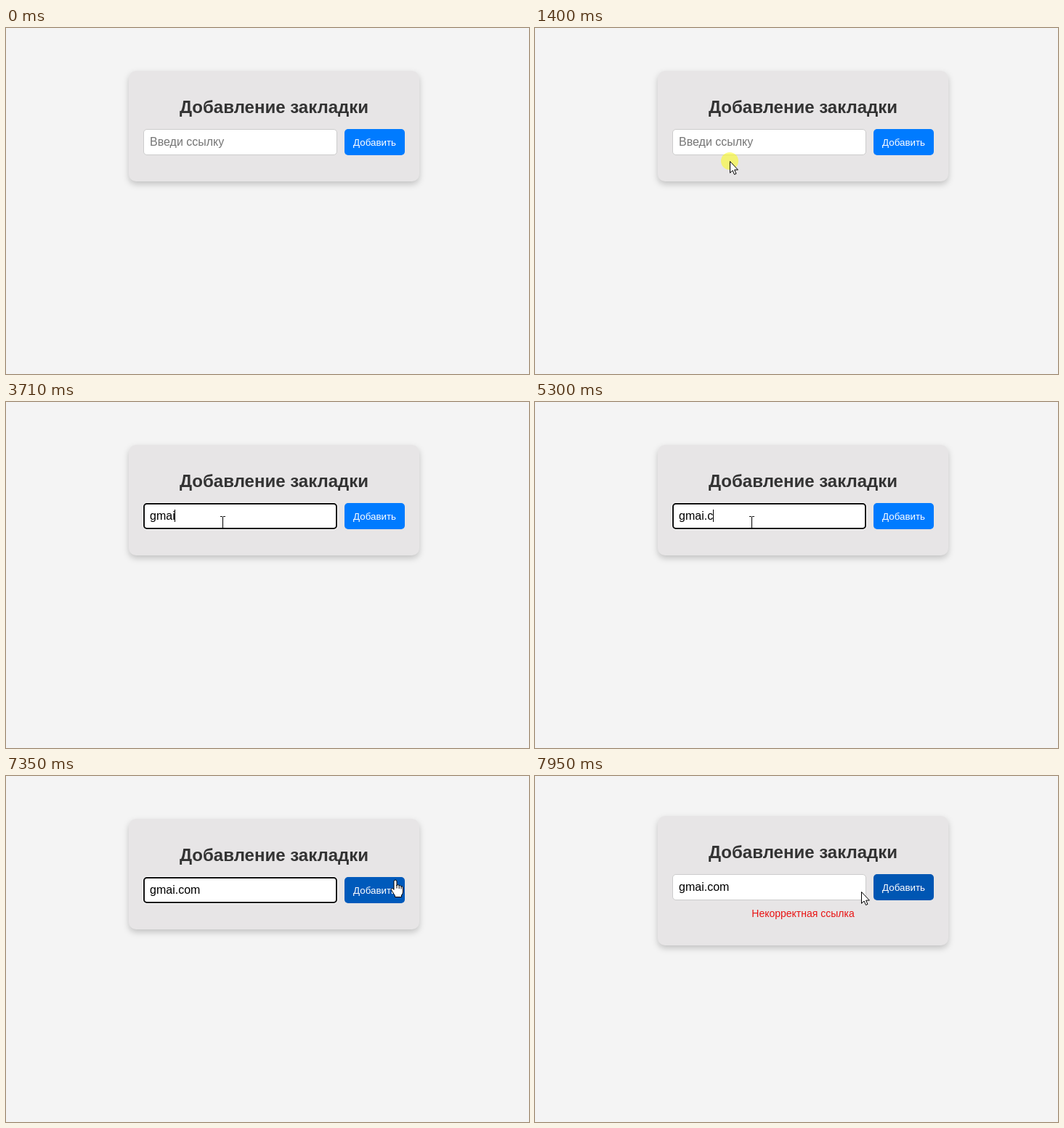
Write an HTML page that moves like this. It is 720 px wide and 476 px high and loops after 8 s.

```html
<!DOCTYPE html>
<html lang="ru">
<head>
<meta charset="utf-8">
<title>Добавление закладки</title>
<style>
  html, body { margin: 0; width: 100%; height: 100%; overflow: hidden; background: #f4f4f4; }
  svg { display: block; width: 720px; height: 476px; font: 16px "Liberation Sans", Arial, sans-serif; }
  #card { filter: drop-shadow(0 4px 4px rgba(0, 0, 0, .2)); }
  #title { font-size: 24px; font-weight: bold; fill: #333; }
  #label { font-size: 13.333px; fill: #fff; }
  #error { font-size: 14px; fill: #e81414; }
  .pointer { fill: #fff; stroke: #000; stroke-linejoin: round; }
</style>
</head>
<body>
<svg viewBox="0 0 720 476">
  <rect id="card" x="169" y="59" width="400" height="152" rx="10" fill="#e7e5e6"/>
  <g id="form">
    <text id="title" x="369" y="117" text-anchor="middle">Добавление закладки</text>
    <rect x="189.5" y="139.5" width="266" height="35" rx="4.5" fill="#fff" stroke="#ccc"/>
    <g id="ring" fill="none">
      <rect x="188.5" y="138.5" width="268" height="37" rx="5.5" stroke="#fff"/>
      <rect x="190" y="140" width="265" height="34" rx="4" stroke="#101010" stroke-width="2"/>
    </g>
    <text id="value" x="198" y="162"></text>
    <rect id="caret" y="148" width="1" height="17"/>
    <rect id="button" x="466" y="139" width="83" height="36" rx="5"/>
    <text id="label" x="507.5" y="162" text-anchor="middle">Добавить</text>
  </g>
  <text id="error" x="369" y="194" text-anchor="middle">Некорректная ссылка</text>
  <g id="cursor">
    <circle id="press" r="12" fill="#ff0" opacity=".5"/>
    <path id="arrow" class="pointer" d="M.5 .5V16.3L4.1 13 6.5 18.5 9 17.4 6.6 12.1H11.4Z"/>
    <path id="beam" fill="none" stroke="#000" d="M-3-7.5H0M1-7.5H4M.5-7V8M-3 8.5H0M1 8.5H4"/>
    <g id="hand" class="pointer">
      <path d="M-2 1Q-2-1 0-1Q2-1 2 1V7Q2 5.5 3.6 5.6Q5 5.7 5.2 7.2Q5.4 6.4 6.6 6.6Q8 6.8 8.1 8.3Q8.4 7.6 9.3 7.8Q10.5 8 10.5 10V15Q10.5 18 8.5 20V22.5H-.5V20.5Q-2 18.5-3.5 16L-5.6 12.6Q-6 11-4.6 10.6Q-3.2 10.4-2 12.4Z"/>
      <path d="M2 6V10.5M5.2 7V11M8.1 8V11.5"/>
    </g>
  </g>
</svg>
<script>
const LOOP = 8000;
const $ = id => document.getElementById(id);
const show = (id, on) => $(id).style.display = on ? '' : 'none';
const last = (list, t) => list.findLast(step => step[0] <= t);

// time, x, y, shape; the pointer holds each place until the next one
const moves = [
  [0, 0, 0, ''],
  [260, 688, 462, 'arrow'], [330, 655, 385, 'arrow'], [400, 617, 308, 'arrow'],
  [470, 576, 232, 'arrow'], [530, 540, 172, 'hand'], [600, 508, 144, 'hand'], [660, 484, 124, 'arrow'],
  [870, 470, 139, 'hand'], [930, 395, 152, 'beam'], [1000, 312, 163, 'beam'], [1060, 276, 168, 'beam'],
  [1200, 271, 179, 'arrow'], [1260, 268, 183, 'arrow'],
  [1530, 282, 173, 'beam'], [1600, 294, 167, 'beam'], [1660, 298, 165, 'beam'],
  [6150, 299, 165, 'beam'], [6220, 299, 164, 'beam'], [6750, 298, 163, 'beam'],
  [6890, 318, 179, 'arrow'], [6950, 368, 199, 'arrow'], [7020, 419, 208, 'arrow'], [7080, 468, 195, 'arrow'],
  [7150, 508, 171, 'hand'], [7220, 526, 156, 'hand'], [7290, 533, 148, 'hand'], [7350, 536, 144, 'hand'],
  [7420, 530, 150, 'hand'], [7480, 523, 156, 'hand'], [7550, 520, 159, 'hand'],
  [7880, 488, 160, 'arrow'], [7950, 449, 159, 'arrow']
];

// time, typed text, caret visible
const typing = [
  [0, '', 0], [1660, '', 1], [2260, 'g', 0], [2320, 'g', 1], [2520, 'gm,', 1],
  [2720, 'gm,a', 1], [2790, 'gm,ai', 1], [3180, 'gm,a', 1],
  [3320, 'gm,', 1], [3450, 'gm', 1], [3580, 'gma', 1], [3710, 'gmai', 1],
  [3980, 'gmai,', 1], [4310, 'gmai', 1], [4510, 'gmai', 0], [4770, 'gmai.', 1],
  [5300, 'gmai.c', 1], [5360, 'gmai.co', 1], [5560, 'gmai.com', 1],
  [6090, 'gmai.com', 0], [6620, 'gmai.com', 1], [7120, 'gmai.com', 0]
];

const presses = [[1400, 1530], [1660, 1800], [7550, 7680]];
const hovers = [[530, 660], [870, 930], [7150, 9000]];
const within = (spans, t) => spans.some(([a, b]) => t >= a && t < b);

const ease = u => 1 - (1 - Math.min(1, Math.max(0, u))) ** 2;
const hoverLevel = t => Math.max(0, ...hovers.map(([a, b]) =>
  ease((Math.min(t, b) - a) / 300) * (1 - ease((t - b) / 300))));

function draw(t) {
  const [, x, y, shape] = last(moves, t);
  const [, text, caret] = last(typing, t);
  const failed = t >= 7610;

  $('form').setAttribute('transform', `translate(0 ${failed ? -4 : 0})`);
  $('card').setAttribute('y', failed ? 55 : 59);
  $('card').setAttribute('height', failed ? 178 : 152);
  show('error', failed);
  show('ring', t >= 1660 && t < 7550);

  const value = $('value');
  value.textContent = text || 'Введи ссылку';
  value.setAttribute('fill', text ? '#000' : '#757575');
  const width = text ? value.getComputedTextLength() : 0;
  $('caret').setAttribute('x', Math.floor(198 + width));
  show('caret', caret);

  const h = hoverLevel(t);
  $('button').setAttribute('fill', `rgb(0, ${123 - 37 * h}, ${255 - 76 * h})`);

  $('cursor').setAttribute('transform', `translate(${x} ${y})`);
  for (const id of ['arrow', 'beam', 'hand']) show(id, id === shape);
  show('press', within(presses, t));
}

const start = performance.now();
function tick() {
  draw((performance.now() - start) % LOOP);
  requestAnimationFrame(tick);
}
tick();
</script>
</body>
</html>
```
